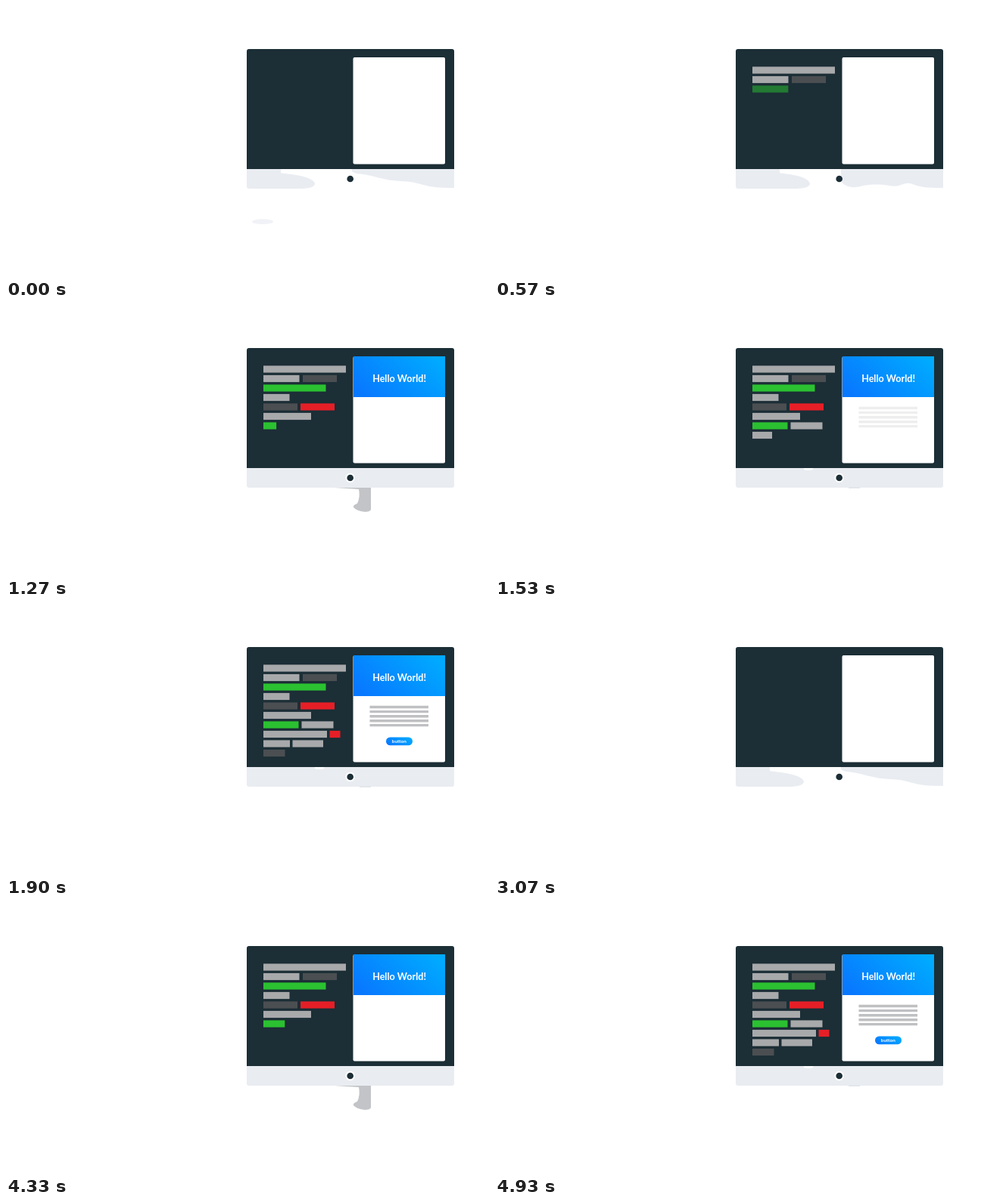
These frames come from a looping animation (638 px wide and 359 px high, 6060 ms). An HTML page:

```html
<!DOCTYPE html>
<html lang="en">
<head>
<meta charset="utf-8">
<title>Coding monitor</title>
<style>
  html, body { margin: 0; width: 100%; height: 100%; overflow: hidden; background: #fff; }
  svg { display: block; width: 100%; height: 100%; }
  text { font-family: Lato, "Open Sans", sans-serif; font-weight: 700; fill: #fff; text-anchor: middle; }
</style>
</head>
<body>
<svg viewBox="0 0 638 359" xmlns="http://www.w3.org/2000/svg">
  <defs>
    <linearGradient id="blue" x1="0" y1=".75" x2="1" y2=".25">
      <stop offset="0" stop-color="#0878ff"/>
      <stop offset="1" stop-color="#00aaff"/>
    </linearGradient>
  </defs>

  <ellipse id="speck" cx="339" cy="285.7" rx="14" ry="3.4" fill="#f1f2f7"/>
  <path id="stand" fill="#c2c4c7" d="M434 242H482V271Q481 274 474 274Q463 273 459 268Q458 265 464 263Q468 255 466 244Z"/>

  <path fill="#e9ecf1" d="M318 216H592V239Q592 242 589 242H321Q318 242 318 239Z"/>
  <path id="gap" fill="#fff"/>
  <g id="trim">
    <ellipse cx="414" cy="217" rx="6.5" ry="2" fill="#fff"/>
    <path d="M467 242.2H482" stroke="#d3dae2"/>
  </g>
  <path fill="#1c2e36" d="M318 216V60Q318 57 321 57H589Q592 57 592 60V216Z"/>
  <circle id="ring" cx="454.7" cy="229" r="6.3" fill="#fff"/>
  <circle cx="454.7" cy="229" r="4.3" fill="#1c2e36"/>

  <rect x="458.5" y="68" width="121.5" height="141.5" rx="2" fill="#fff"/>
  <g id="header">
    <rect x="459" y="68" width="121" height="54" fill="url(#blue)"/>
    <text x="519.6" y="102" font-size="12.6">Hello World!</text>
  </g>
  <path id="paragraph" stroke="#bfc0c2" stroke-width="3.4"
    d="M480.5 136.5H558M480.5 142.6H558M480.5 148.7H558M480.5 154.8H558M480.5 160.6H558"/>
  <g id="button">
    <rect x="502" y="176.5" width="35" height="10.8" rx="5.4" fill="url(#blue)"/>
    <text x="519.3" y="184.1" font-size="6.4">button</text>
  </g>
  <g id="code"></g>
</svg>

<script>
  const LOOP = 6060, ROUND = 3030, SECOND_START = 3070;
  const GRAY = '#a8a9ab', DARK = '#4b4f52', GREEN = '#2bc131', RED = '#e61f27';
  const byId = id => document.getElementById(id);

  // row, left, right, colour, start, end
  const bars = [
    [0, 340, 449, GRAY, 205, 310],
    [1, 340, 387.5, GRAY, 310, 410],
    [1, 392, 437, DARK, 410, 505],
    [2, 340, 422.5, GREEN, 505, 620],
    [3, 340, 374.5, GRAY, 625, 730],
    [4, 340, 385, DARK, 870, 970],
    [4, 389, 434, RED, 970, 1085],
    [5, 340, 403, GRAY, 1085, 1215],
    [6, 340, 386.5, GREEN, 1225, 1350],
    [6, 390.5, 432.5, GRAY, 1350, 1470],
    [7, 340, 424, GRAY, 1500, 1600],
    [7, 427.5, 441.5, RED, 1600, 1650],
    [8, 340, 375, GRAY, 1650, 1730],
    [8, 378.5, 419, GRAY, 1730, 1820],
    [9, 340, 368.5, DARK, 1820, 1900]
  ].map(([row, left, right, color, start, end]) => {
    const el = document.createElementNS('http://www.w3.org/2000/svg', 'rect');
    const attrs = { x: left, y: 80.4 + row * 12.5, height: 9.2, fill: color };
    for (const key in attrs) el.setAttribute(key, attrs[key]);
    byId('code').append(el);
    return { el, width: right - left, start, end, fades: start < 870 };
  });

  // The unpainted part of the chin: left top, left tip, heights of its right edge
  const edgeX = [575, 558, 545, 530, 512, 490, 475, 462, 457];
  const poses = [
    [200, 363, 408, 241, 239, 235, 232, 232, 227, 223, 222, 219],
    [570, 376, 416, 241, 239, 233, 240, 236, 237, 241, 238, 232],
    [730, 397, 426, 242, 242, 242, 242, 242, 240, 242, 240, 236]
  ];

  const ramp = (t, start, end) => Math.min(1, Math.max(0, (t - start) / (end - start)));
  const fade = (id, value) => byId(id).setAttribute('opacity', value);

  function gapPath(t) {
    const i = t < poses[1][0] ? 0 : 1;
    const [from, to] = [poses[i], poses[i + 1]];
    const k = ramp(t, from[0], to[0]);
    const [, top, tip, ...ys] = from.map((v, n) => v + (to[n] - v) * k);
    let d = `M${top} 215V221C${top + 12} 223 ${tip - 3} 225 ${tip} 235` +
            `C${tip} 240 ${tip - 8} 242 ${tip - 24} 242.5H592V241`;
    for (let n = 0; n < ys.length - 1; n++) {
      d += `Q${edgeX[n]} ${ys[n]} ${(edgeX[n] + edgeX[n + 1]) / 2} ${(ys[n] + ys[n + 1]) / 2}`;
    }
    return d + `L457 ${ys[8]}V215Z`;
  }

  function draw(now) {
    const time = now % LOOP;
    const t = time < SECOND_START ? time : time - ROUND;

    for (const { el, width, start, end, fades } of bars) {
      const p = ramp(t, start, end);
      el.setAttribute('width', width * p);
      el.setAttribute('opacity', fades ? Math.min(1, p * 0.9 + (p === 1)) : 1);
    }

    const filled = ramp(t, 870, 1000);
    byId('gap').setAttribute('d', gapPath(t));
    fade('gap', 1 - filled);
    fade('ring', filled);
    fade('header', ramp(t, 870, 1070));
    fade('paragraph', ramp(t, 1480, 1680));
    fade('button', ramp(t, 1650, 1850));
    fade('speck', time < 200 ? 1 : 0);
    fade('stand', t >= 1170 && t < 1530 ? 1 : 0);
    fade('trim', t >= 1530 ? 1 : 0);
  }

  const begin = performance.now();
  function tick() {
    draw(performance.now() - begin);
    requestAnimationFrame(tick);
  }
  tick();
</script>
</body>
</html>
```
